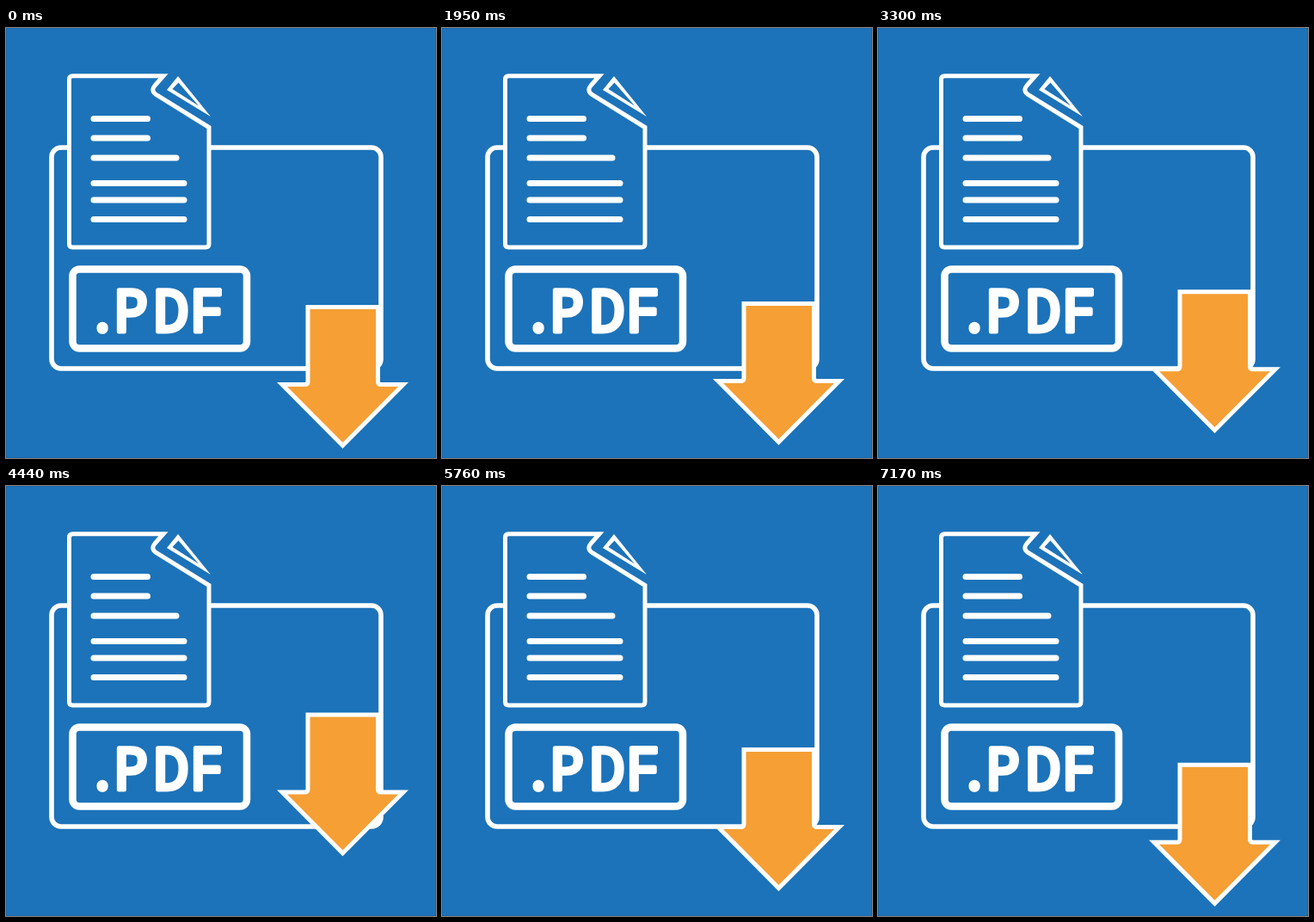
Write an HTML page that moves like this. It is 500x500 px and loops after 7.2 s.

```html
<!DOCTYPE html>
<html lang="en">
<head>
<meta charset="utf-8">
<title>PDF download</title>
<style>
  html, body { margin: 0; height: 100%; overflow: hidden; background: #1c73b9; }
  svg { display: block; width: 100%; height: 100%; }
  .line { fill: #1c73b9; stroke: #fff; }
  text { font: 400 67px "Noto Sans Mono", monospace; fill: #fff; stroke: #fff; stroke-width: 5; stroke-linejoin: round; }
</style>
</head>
<body>
<svg viewBox="0 0 500 500">
  <rect x=".5" y=".5" width="499" height="499" fill="#1c73b9" stroke="#1a66a5"/>

  <!-- folder -->
  <rect class="line" x="53" y="139" width="383" height="257" rx="11" stroke-width="5.6"/>

  <!-- page with folded corner -->
  <path class="line" stroke-width="5" d="M183 55.7H77.500Q73.500 55.700 73.500 59.700V251Q73.500 255 77.500 255H232Q236 255 236 251V115.500L174.500 77.500Q168 73 173 67Z"/>
  <path fill="#fff" fill-rule="evenodd" d="M200 56L187 72L238 103ZM200.500 63.500L193.500 71L224 90.500Z"/>
  <path stroke="#fff" stroke-width="7" stroke-linecap="round" d="M102 105.500H164.500M102 128H164.500M102 151H198M102 180.500H207M102 200H207M102 222.500H207"/>

  <!-- label -->
  <rect class="line" x="77.500" y="280.500" width="202.500" height="92" rx="8" stroke-width="8.500"/>
  <text x="92 125 172 214" y="352.500">.PDF</text>

  <path id="arrow" fill="#f59f35" stroke="#fff" stroke-width="5" stroke-miterlimit="8"
    d="M351 324.500H432.500V411Q432.500 414.500 436 414.500H462L391.500 485.500L321 414.500H347.500Q351 414.500 351 411Z"/>
</svg>
<script>
  const LOOP = 7200, RISE = 60;
  // [time, height] stops; the arrow eases along a half cosine between them
  const stops = [[0, 0], [900, 1], [1800, 0], [2700, 1], [2730, 1], [3630, 0], [4530, 1], [5430, 0], [6330, 1], [LOOP, 0]];
  const arrow = document.getElementById('arrow');

  function height(t) {
    const i = stops.findIndex(([end]) => t < end);
    const [t0, h0] = stops[i - 1], [t1, h1] = stops[i];
    const ease = (1 - Math.cos(Math.PI * (t - t0) / (t1 - t0))) / 2;
    return h0 + (h1 - h0) * ease;
  }

  const start = performance.now();
  function draw() {
    const t = (performance.now() - start) % LOOP;
    arrow.setAttribute('transform', `translate(0 ${-RISE * height(t)})`);
    requestAnimationFrame(draw);
  }
  draw();
</script>
</body>
</html>
```
